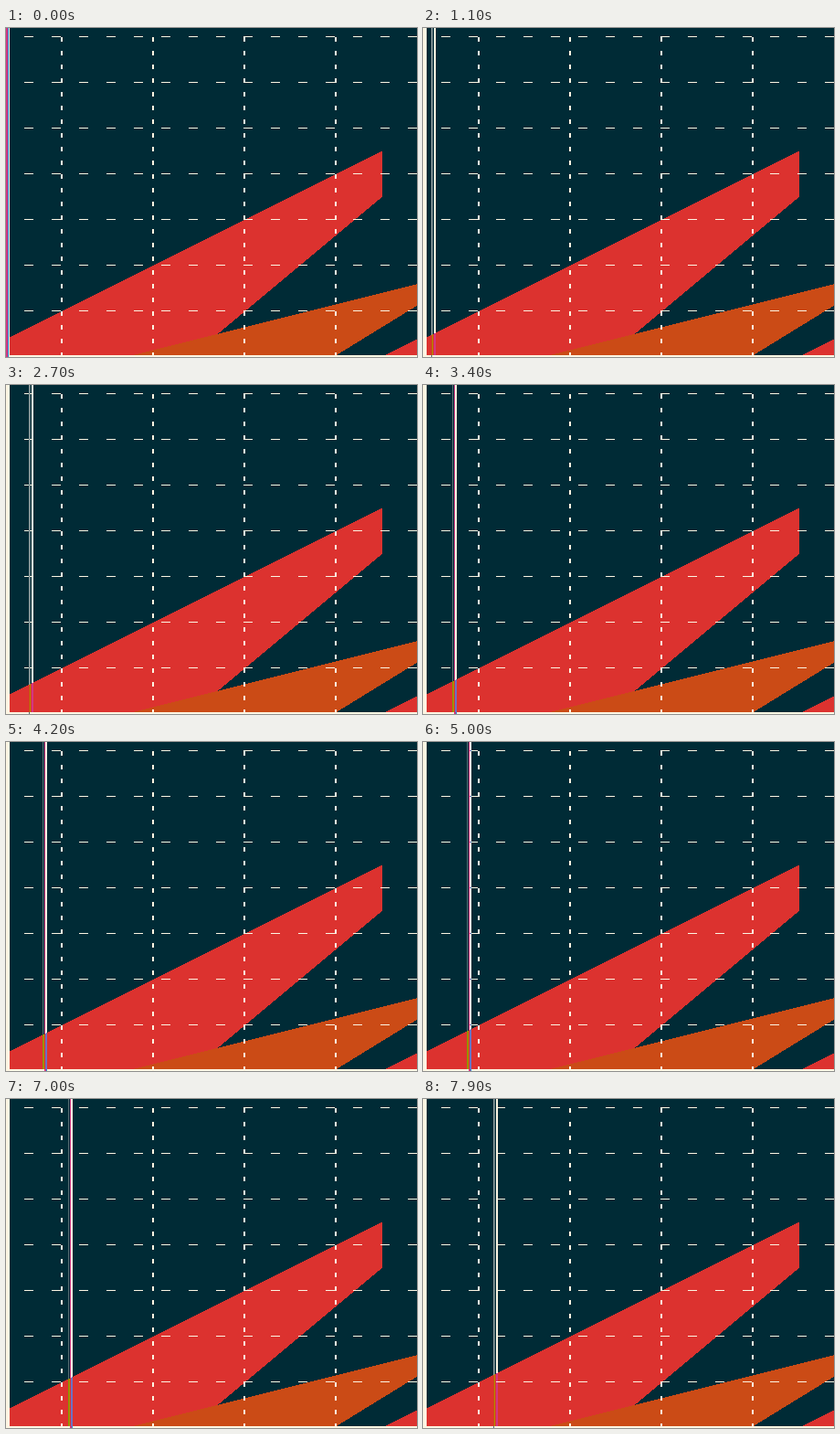
Write an HTML page with a canvas that moves like this. It is 450x360 px and loops after 8 s.

```html
<!DOCTYPE html>
<html>
<head>
<meta charset="utf-8">
<style>
html, body { margin: 0; width: 100%; height: 100%; overflow: hidden; background: #002b36; }
canvas { display: block; }
</style>
</head>
<body>
<canvas id="stage" width="450" height="360"></canvas>
<script>
const W = 450, H = 360, FLOOR = 358, STEP = 100, STEPS = 80;
const ctx = document.getElementById('stage').getContext('2d');
const dark = '#002b36', cream = '#fdf6e3', red = '#dc322f', orange = '#cb4b16';
const grey = '#586e75', silver = '#93a1a1', yellow = '#b58900', green = '#859900';
const magenta = '#d33682', violet = '#6c71c4', blue = '#268bd2';
const plain = { dark, cream, red };

// Colours of the five sweep columns over each ground, for even and odd steps.
const sweep = [
  {
    dark: [grey, dark, magenta, cream, cream],
    red: [green, yellow, red, violet, violet],
    cream: [cream, cream, magenta, magenta, blue]
  },
  {
    dark: [silver, grey, dark, cream, cream],
    red: [orange, yellow, red, magenta, magenta],
    cream: [grey, cream, cream, cream, cream]
  }
];

function bar(x, top, bottom, color) {
  top = Math.round(top);
  bottom = Math.min(Math.round(bottom), FLOOR);
  if (bottom <= top) return;
  ctx.fillStyle = color;
  ctx.fillRect(x, top, 1, bottom - top);
}

function column(x, c) {
  ctx.fillStyle = c.cream;
  ctx.fillRect(x, 0, 1, H);
  if (x < 4) return;
  bar(x, 0, FLOOR, c.dark);

  if (x < 412) bar(x, 340 - x / 2, 185 + (411 - x) * 5 / 6, c.red);
  bar(x, 357 - (x - 142) / 4, 357.5 - (x - 362) * 0.614, orange);
  if (x >= 412) bar(x, 357 - (x - 416) / 2, FLOOR, c.red);

  if (x >= 20 && (x - 20) % 30 < 10)
    for (let y = 9; y < H; y += 50) bar(x, y, y + 1, c.cream);
  if (x >= 60 && (x - 60) % 100 < 2)
    for (let y = 10; y < H; y += 15) bar(x, y, y + 5, c.cream);
}

function draw(now) {
  const step = Math.floor(now / STEP) % STEPS;
  const tones = sweep[step % 2];
  for (let x = 0; x < W; x++) {
    const i = x - step + 2;
    column(x, i < 0 || i > 4 ? plain
      : { dark: tones.dark[i], red: tones.red[i], cream: tones.cream[i] });
  }
}

const start = performance.now();
function frame() {
  draw(performance.now() - start);
  requestAnimationFrame(frame);
}
frame();
</script>
</body>
</html>
```
